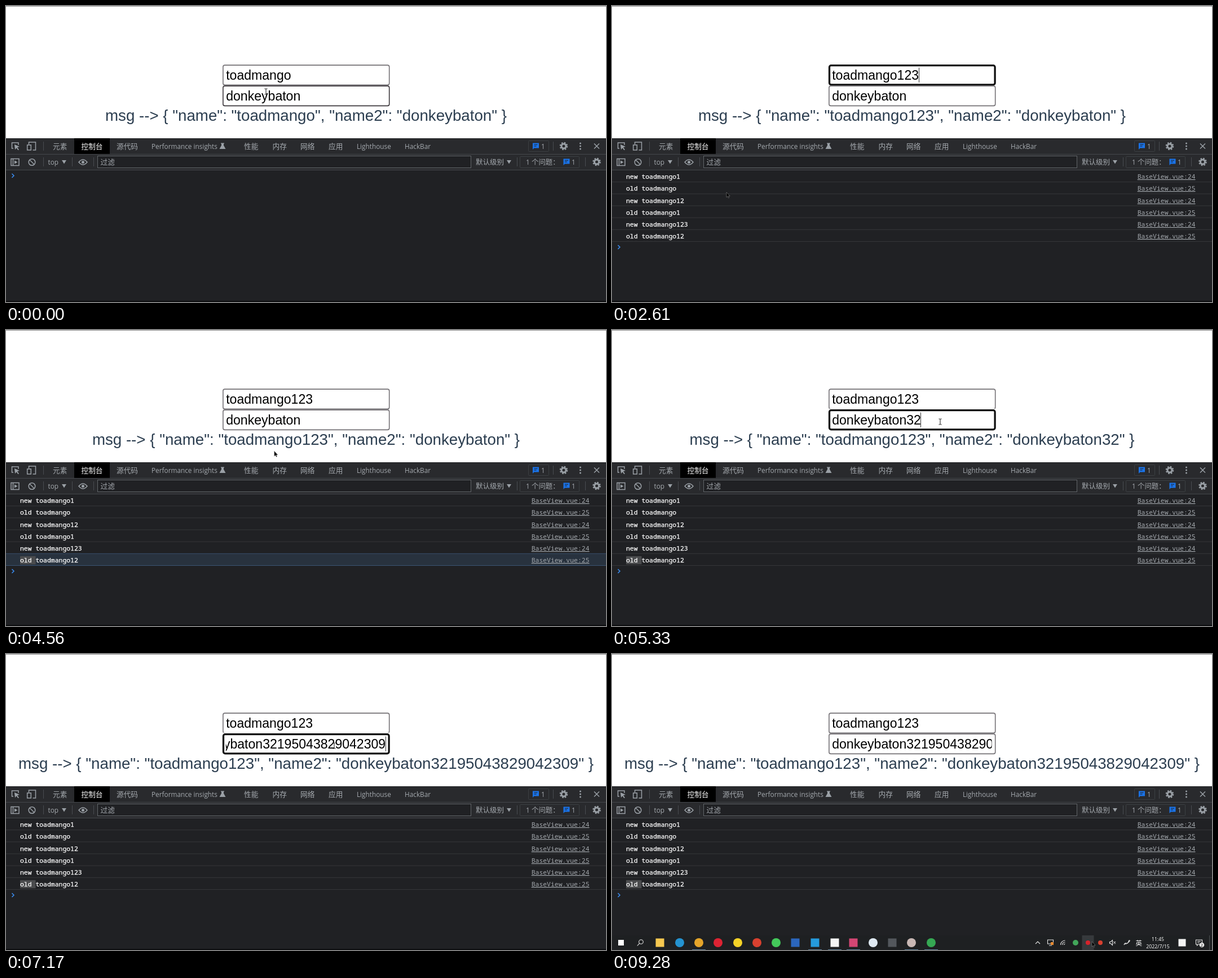
Animation, 1064 px wide and 526 px high, one loop 9.34 s. Source, as an HTML page:

```html
<!DOCTYPE html>
<html lang="zh">
<head>
<meta charset="utf-8">
<style>
html, body { margin: 0; width: 100%; height: 100%; overflow: hidden; background: #fff; }
svg { display: block; width: 100vw; height: 100vh; }
.page { font-family: "Liberation Sans", Arial, sans-serif; }
.ui { font: 11.8px "Open Sans", "Noto Sans", sans-serif; fill: #a4a9ae; }
.cjk { font: 12.7px "Noto Sans CJK SC", "Noto Sans CJK", sans-serif; fill: #a4a9ae; }
.mono { font: 11.43px "Noto Sans Mono", monospace; white-space: pre; }
.log { fill: #fff; stroke: #fff; stroke-width: .25; }
.link { fill: #a4a9ae; text-decoration: underline; text-anchor: end; }
.ico { fill: none; stroke: #9aa0a6; stroke-width: 1.5; }
.lit { fill: none; stroke: #e8e8e8; stroke-width: 1.1; }
</style>
</head>
<body>
<svg id="stage" viewBox="0 0 1064 526" preserveAspectRatio="none"></svg>
<script>
const LOOP = 9340, STEP = 55.6, ROW = 21.17, TOP = 292;
const NAME = "toadmango", NAME2 = "donkeybaton";
const DIGITS = "123", DIGITS2 = "32195043829042309";

// [time, digits typed so far]
const typed1 = [[1720, 1], [1940, 2], [2330, 3]];
const typed2 = [[5330, 2], [5390, 3], [5610, 4], [5670, 6], [5720, 7], [5780, 9],
  [5830, 10], [5890, 12], [5940, 13], [6000, 15], [6050, 16], [6110, 17]];

// [time, x, y]
const path = [[0, 461, 152], [330, 492, 140], [720, 549, 123], [1060, 549, 123], [1280, 551, 122],
  [2280, 551, 122], [2610, 203, 331], [3170, 54, 385], [3390, 54, 385], [3660, 30, 409],
  [3890, 30, 409], [4780, 557, 180], [4940, 582, 163], [7620, 582, 163], [7830, 793, 504],
  [8010, 793, 504], [8280, 806, 522], [8940, 845, 514], [9280, 851, 511]];

const rect = (x, y, w, h, fill, more = "") =>
  `<rect x="${x}" y="${y}" width="${w}" height="${h}" fill="${fill}" ${more}/>`;
const text = (x, y, str, cls, more = "") => `<text x="${x}" y="${y}" class="${cls}" ${more}>${str}</text>`;
const line = (d, cls = "ico", more = "") => `<path d="${d}" class="${cls}" ${more}/>`;
const dot = (x, y, r, fill, more = "") => `<circle cx="${x}" cy="${y}" r="${r}" fill="${fill}" ${more}/>`;
const sep = (x, y) => rect(x, y - 8, 1, 16, "#494c50");
const down = (x, y) => `<path d="M${x - 4} ${y - 3}h8l-4 6.5z" fill="#9aa0a6"/>`;
const gear = (x, y) => dot(x, y, 4, "none", 'stroke="#9aa0a6" stroke-width="3"') +
  dot(x, y, 6.2, "none", 'stroke="#9aa0a6" stroke-width="2.2" stroke-dasharray="2.6 2.27"');
const bubble = (x, y) => `<path d="M${x - 5.5} ${y - 5.5}h11v9h-8.5l-2.5 2.5z" fill="#1a73e8"/>` +
  line(`M${x - 3} ${y - 2.7}h6M${x - 3} ${y}h4`, "ico", 'style="stroke:#202124;stroke-width:1"');

// a focused field has a white halo outside its dark ring
function field(i) {
  const y = 105 + 37 * i;
  return rect(382.5, y - 2.6, 299.6, 40.4, "#fff", `id="halo${i}" rx="5"`) +
    `<rect id="box${i}" fill="#fff"/>
    <g clip-path="url(#clip${i})">${text(390.2, y + 26, "", "page", `id="val${i}" font-size="23.07"`)}</g>
    ${rect(0, y + 4.5, 1, 26.5, "#333", `id="caret${i}"`)}`;
}

function devtools() {
  const tabs = [[83, "元素"], [196, "源代码"], [422, "性能"], [472.5, "内存"], [522, "网络"], [572, "应用"]];
  return rect(0, 235, 1064, 291, "#202124") + rect(0, 235, 1064, 56, "#292a2d") +
    rect(0, 263, 1064, 1, "#45484c") + rect(0, 291, 1064, 1, "#45484c") +
    rect(0, 524, 1064, 2, "#0c0d0f") +
    line("M13 253h-2.500v-10h11.500v4") +
    `<path d="M15 246l9 4-4 1.300 3 4-1.500 1-3-4-2.500 3z" fill="#9aa0a6"/>` +
    line("M40.500 246v-4h12v14h-5M37.700 247h6.600v9h-6.600z") + sep(66, 249) +
    rect(121, 235, 63, 28, "#000") + text(133.5, 254, "控制台", "cjk", 'style="fill:#fff"') +
    tabs.map(([x, s]) => text(x, 254, s, "cjk")).join("") +
    text(258, 253.5, "Performance insights", "ui") + text(622, 253.5, "Lighthouse", "ui") +
    text(707, 253.5, "HackBar", "ui") +
    `<path d="M381 243.500h6v1.200h-1v3l3.500 6.300h-11l3.500-6.300v-3h-1z" fill="#9aa0a6"/>` +
    rect(926.5, 239.5, 36, 19, "none", 'stroke="#3c4043" rx="1"') + bubble(939.5, 249) +
    text(949, 253.5, "1", "ui") + sep(970, 249) + gear(989, 249) +
    [244, 249, 254].map(y => dot(1018.5, y, 1.5, "#9aa0a6")).join("") +
    line("M1043 244.500l9 9M1052 244.500l-9 9") +
    // second row
    line("M9 271.500h14v12h-14zM12.500 271v13") + `<path d="M15 274.500l5.500 3-5.500 3z" fill="#9aa0a6"/>` +
    dot(46, 277.5, 5.8, "none", 'class="ico"') + line("M42 273.500l8 8") + sep(66, 277) +
    text(74.5, 281.5, "top", "ui") + down(103, 277) + sep(117, 277) +
    line("M129 277.500q7.500-9 15 0q-7.500 9-15 0z") + dot(136.5, 277.5, 2.5, "#9aa0a6") + sep(155, 277) +
    rect(162.5, 266.5, 662, 21, "#202124", 'stroke="#62666a"') + text(167.5, 282, "过滤", "cjk") +
    text(833, 282, "默认级别", "cjk", 'style="font-size:12.5px"') + down(892, 277) + sep(906, 277) +
    rect(911.5, 267.5, 105, 20, "none", 'stroke="#3c4043" rx="1"') +
    text(922, 281.5, "1", "ui") + text(932, 282, "个问题：", "cjk", 'style="font-size:12.4px"') +
    bubble(994, 277) + text(1003, 281.5, "1", "ui") + sep(1027, 277) + gear(1047.5, 277);
}

function consoleRow(i) {
  const y = TOP + ROW * i, n = i >> 1, old = i % 2;
  const base = Math.round(y + 15.2);
  const label = (old ? "old " : "new ") + NAME + DIGITS.slice(0, old ? n : n + 1);
  return `<g id="row${i}">${rect(0, y, 1064, ROW, "none", `id="hot${i}"`)}
    ${rect(0, y + ROW - 1, 1064, 1, "#35373a", `id="edge${i}"`)}
    ${rect(25, y + 4, 27.5, 14.5, "#4b4c4e", `id="sel${i}"`)}
    ${text(25, base, label, "mono log")}
    ${text(1034.5, base, "BaseView.vue:" + (24 + old), "mono link")}</g>`;
}

function taskbar() {
  const circles = [[120, "#2493d1"], [154, "#e5a52a"], [188, "#dd2333"], [223, "#f5d327"], [257, "#d8402f"],
    [291, "#43c95a"], [463, "#dfe9f2"], [531, "#c9b8b5"], [566, "#35a853"]];
  const squares = [[16, 10, "#fff"], [85, 15, "#f6c850"], [325, 15, "#2b66bd"], [360, 15, "#259bdd"],
    [395, 15, "#f4f4f4"], [428, 15, "#d34674"], [497, 15, "#53575c"], [1011, 13, "#f4f4f4"]];
  return rect(0, 500, 1064, 26, "#1e2022") + rect(137, 500, 34, 26, "#393c40", 'id="active"') +
    rect(833.5, 500, 21, 26, "#36393c", 'id="trayHot"') + rect(1059, 500, 1, 26, "#4c4f52") +
    circles.map(([x, c]) => dot(x, 513, 8, c)).join("") +
    squares.map(([x, s, c]) => rect(x - s / 2, 513 - s / 2, s, s, c)).join("") +
    [154, 360, 395, 428, 531, 566].map(x => rect(x - 12, 525, 24, 1, "#678ba5")).join("") +
    dot(51.5, 511.5, 3.8, "none", 'class="lit"') + line("M48.800 514.200l-4 4.300", "lit") +
    line("M751 515l4-4 4 4", "lit") +
    line("M772.500 508h10v7h-10zM775 518h5", "lit") + rect(778, 512, 5, 5, "#e68a32") +
    line("M795.500 517a8 8 0 0 1 8-8M798.500 517a5 5 0 0 1 5-5M801.500 517a2 2 0 0 1 2-2", "lit") +
    dot(822, 513, 5, "#42a65a") + dot(844, 513, 4, "#d6232b") + dot(866, 513, 4, "#d8402f") +
    line("M882.500 511.500h2l3-3v9l-3-3h-2zM889.500 511l3.500 4M893 511l-3.500 4", "lit") +
    line("M908 517q1-4 4-3t4-3q1-3 2-2t-3 4-5 2-2 2z", "lit") +
    text(928.5, 517.5, "英", "cjk", 'style="font-size:11.5px;fill:#fff"') +
    text(968, 510, "11:45", "ui", 'text-anchor="middle" style="font-size:8.6px;fill:#fff"') +
    text(968, 523, "2022/7/15", "ui", 'text-anchor="middle" style="font-size:8.8px;fill:#fff"') +
    line("M1035.500 508h11v8h-7l-2 2v-2h-2zM1038 510.500h6M1038 513h4", "lit") +
    dot(1046, 517, 4.3, "#e8e8e8") +
    text(1046, 519.8, "2", "ui", 'text-anchor="middle" style="font-size:7.5px;fill:#111"');
}

const clip = i => `<clipPath id="clip${i}">${rect(389.8, 105 + 37 * i, 283.7, 36, "#000")}</clipPath>`;
document.getElementById("stage").innerHTML =
  `<defs>${clip(0)}${clip(1)}</defs>` + rect(0, 0, 1064, 526, "#fff") + rect(0, 0, 1064, 1, "#8c8c8c") +
  field(0) + field(1) +
  text(532, 204, "", "page", 'id="msg" font-size="27.7" fill="#2c3e50" text-anchor="middle"') +
  devtools() + [0, 1, 2, 3, 4, 5].map(consoleRow).join("") +
  `<path id="prompt" d="M10.500 298l3.500 3.500-3.500 3.500" fill="none" stroke="#3b8cf0" stroke-width="1.6"/>` +
  `<g id="bar">${taskbar()}</g>` +
  `<path id="arrow" d="M0 0v9l2-1.800 1.500 3 1.300-.600-1.400-3h2.800z" fill="#000" stroke="#8a8a8a" stroke-width=".6"/>` +
  `<path id="beam" d="M-2.500-5h2l.5.500.5-.500h2M0-4.500v9M-2.500 5h2l.5-.500.5.500h2" fill="none" stroke="#111" stroke-width="1"/>`;

const $ = id => document.getElementById(id);
const set = (id, attrs) => { for (const k in attrs) $(id).setAttribute(k, attrs[k]); };
const show = (id, on) => set(id, { visibility: on ? "visible" : "hidden" });
const latest = (keys, first, q) => keys.reduce((k, e) => q >= e[0] - 25 ? e : k, [first, 0]);

function pointer(q) {
  let i = path.length - 2;
  while (i && q < path[i][0]) i--;
  const [t0, x0, y0] = path[i], [t1, x1, y1] = path[i + 1];
  const p = Math.min(1, Math.max(0, (q - t0) / (t1 - t0))), e = p * p * (3 - 2 * p);
  return [x0 + (x1 - x0) * e, y0 + (y1 - y0) * e];
}

function drawField(i, value, focus, hover, since, q) {
  const y = 105 + 37 * i, inset = focus ? 1.2 : .6;
  show("halo" + i, focus);
  set("box" + i, { x: 384.3 + inset, y: y - .5 + inset, width: 296 - 2 * inset, height: 36.5 - 2 * inset,
    rx: focus ? 3 : 3.2, stroke: focus ? "#101010" : hover ? "#3b363b" : "#737074",
    "stroke-width": focus ? 3.3 : 1.6 });
  const val = $("val" + i);
  val.textContent = value;
  const w = val.getComputedTextLength();
  const x = focus ? Math.min(390.2, 673.2 - w) : 390.2;
  set("val" + i, { x });
  set("caret" + i, { x: Math.floor(x + w) });
  show("caret" + i, focus && Math.floor((q - since + 26) / 525) % 2 === 0);
}

function render(t) {
  const q = Math.min(167, Math.floor((t + 14) / STEP)) * STEP;
  const between = (a, b) => q >= a - 25 && q < b - 25;
  const [x, y] = pointer(q);
  const [since1, n1] = latest(typed1, 660, q), [since2, n2] = latest(typed2, 4890, q);
  const name = NAME + DIGITS.slice(0, n1), name2 = NAME2 + DIGITS2.slice(0, n2);
  const over = i => x > 384 && x < 681 && y > 105 + 37 * i && y < 141 + 37 * i;

  drawField(0, name, between(660, 3170), over(0), since1, q);
  drawField(1, name2, between(4890, 9060), over(1), since2, q);
  $("msg").textContent = `msg --> { "name": "${name}", "name2": "${name2}" }`;

  const hot = between(3170, 3720) ? 4 : between(3720, 4890) ? 5 : -1;
  const sel = between(3280, 3720) ? 4 : q >= 3865 ? 5 : -1;
  for (let i = 0; i < 6; i++) {
    set("row" + i, { display: i < n1 * 2 ? "inline" : "none" });
    set("hot" + i, { fill: i === hot ? "#28323e" : "none" });
    set("edge" + i, { fill: hot >= 0 && (i === hot || i === hot - 1) ? "#3b5575" : "#35373a" });
    show("sel" + i, i === sel);
  }
  set("prompt", { transform: `translate(0 ${n1 * 2 * ROW})` });

  const rise = Math.min(1, Math.max(0, (q - 8000) / 230));
  set("bar", { transform: `translate(0 ${26 * (1 - rise) ** 2})` });
  show("bar", rise > 0);
  set("active", { opacity: between(8000, 9060) ? 1 : 0 });
  set("trayHot", { opacity: x > 834 && rise === 1 ? 1 : 0 });

  const beam = over(0) || over(1);
  show("beam", beam);
  show("arrow", !beam);
  set(beam ? "beam" : "arrow", { transform: `translate(${x} ${y})` });
}

const start = performance.now();
function frame() {
  render((performance.now() - start) % LOOP);
  requestAnimationFrame(frame);
}
frame();
</script>
</body>
</html>
```
